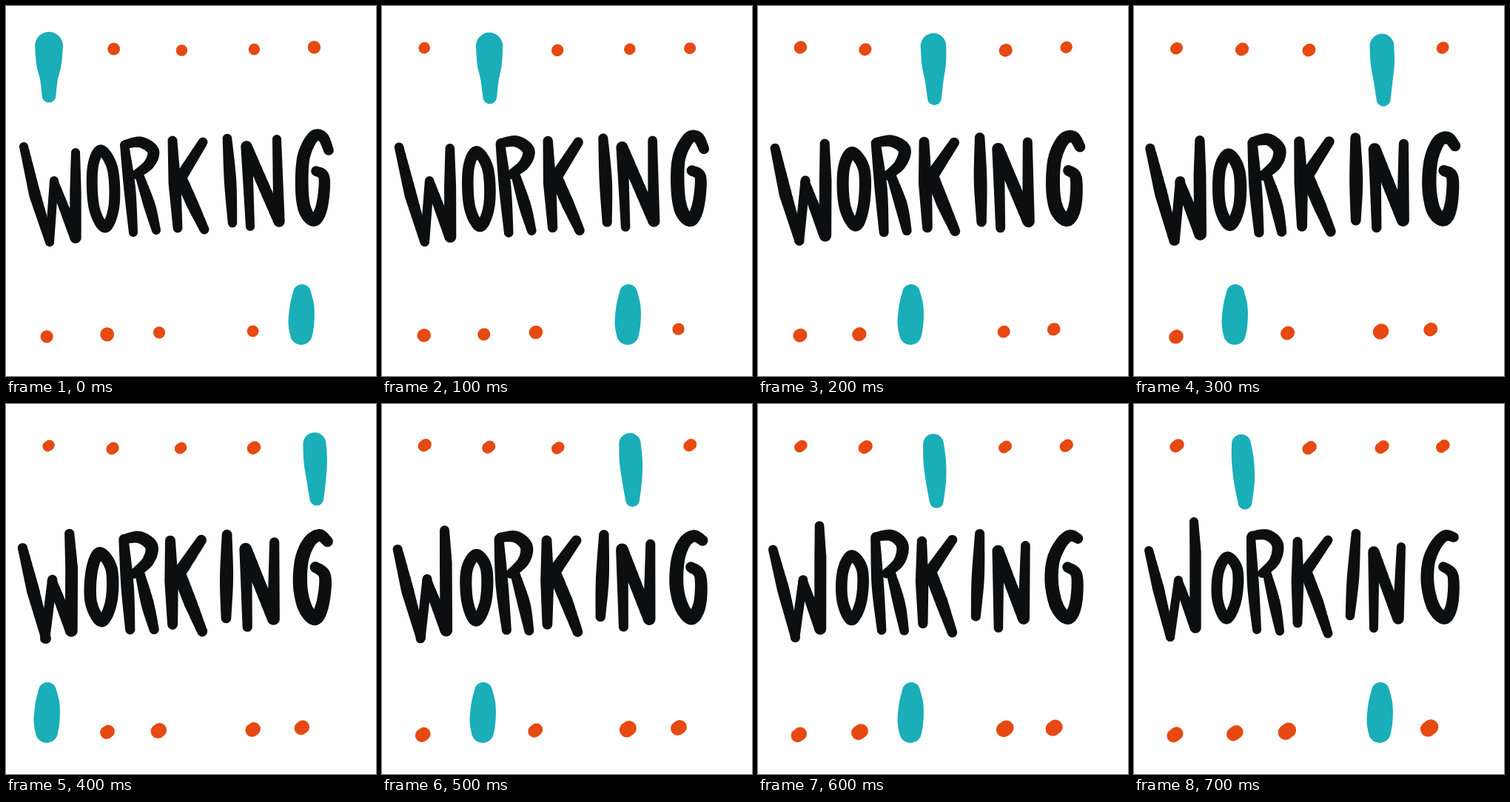
An HTML page with a canvas for the animation above (800 ms loop, 500 by 500 pixels).

```html
<!DOCTYPE html>
<html lang="en">
<head>
<meta charset="utf-8">
<title>Working</title>
<style>
  html, body { margin: 0; width: 100%; height: 100%; overflow: hidden; background: #fefefe; }
  /* eight drawings stacked in one strip, shown one at a time */
  canvas { display: block; width: 500px; height: 4000px; animation: flip 800ms steps(8) infinite; }
  @keyframes flip { to { transform: translateY(-4000px); } }
</style>
</head>
<body>
<canvas width="500" height="4000" role="img" aria-label="WORKING"></canvas>
<script>
const INK = '#0c0e0f', TEAL = '#1aaeb8', ORANGE = '#e64912';
const DRAWINGS = 8, STAGE = 500, STEP = 1.2;

// Each letter drifts between two poses: "x,y" points, "/" starts a new stroke.
const letters = {
  W: { kind: 'line', weight: 8,
    from: '24,190 39,255 59,319/59,319 65,236/65,238 94,313 94,250 94,198',
    to: '20,198 33,250 49,315/49,315 60,238/60,240 83,302 83,200 81,159' },
  O: { kind: 'loop', weight: 7.5,
    from: '128,195 117,220 119,272 134,299 146,270 144,220',
    to: '126,207 114,228 113,265 125,290 138,265 140,225' },
  R: { kind: 'curve', weight: 8,
    from: '160,188 167,245 172,306/161,187 182,184 199,196 193,214 175,228/181,231 194,270 203,303',
    to: '158,180 161,245 166,305/159,178 180,177 194,190 190,212 173,229/180,230 190,270 197,307' },
  K: { kind: 'line', weight: 8.5,
    from: '225,182 228,240 232,300/266,184 236,232 252,268 268,302',
    to: '221,186 221,240 221,296/262,184 232,226 248,268 262,310' },
  I: { kind: 'curve', weight: 8.3,
    from: '299,179 303,236 306,293',
    to: '300,175 296,235 292,286' },
  N: { kind: 'line', weight: 8,
    from: '330,298 325,190 369,291 366,180',
    to: '324,303 324,200 357,290 361,193' },
  G: { kind: 'curve', weight: 9,
    from: '436,195 428,177 415,177 402,205 400,250 405,278 417,289 427,270 430,232 419,223',
    to: '432,180 420,178 407,192 398,215 397,245 405,275 420,289 430,270 431,232 418,220' }
};

const topColumns = [58, 145, 237, 335, 417];
const lowColumns = [56, 137, 207, 333, 400];

const ctx = document.querySelector('canvas').getContext('2d');

const parse = text => text.split('/').map(s => s.split(' ').map(p => p.split(',').map(Number)));

const lerp = (p, q, u) => p.map((v, i) => v + (q[i] - v) * u);

// Seeded noise in -1..1
function noise(seed) {
  let s = seed * 7919 + 17;
  return () => (s = s * 16807 % 2147483647) / 1073741823.5 - 1;
}

function spline(a, b, c, d, u) {
  return b.map((v, i) => v + u / 2 * (c[i] - a[i] +
    u * (2 * a[i] - 5 * v + 4 * c[i] - d[i] + u * (3 * (v - c[i]) + d[i] - a[i]))));
}

// Brush stroke through [x, y, radius] points: overlapping circles.
function brush(pts, color, kind = 'curve') {
  const n = pts.length, loop = kind === 'loop';
  const at = i => pts[loop ? (i + n) % n : Math.max(0, Math.min(n - 1, i))];
  const stamp = ([x, y, r]) => {
    ctx.moveTo(x + r, y);
    ctx.arc(x, y, r, 0, 2 * Math.PI);
  };
  ctx.fillStyle = color;
  ctx.beginPath();
  stamp(pts[0]);
  for (let i = 0; i < (loop ? n : n - 1); i++) {
    const p = at(i), q = at(i + 1);
    const count = Math.ceil(Math.hypot(q[0] - p[0], q[1] - p[1]) / STEP);
    for (let k = 1; k <= count; k++) {
      const u = k / count;
      stamp(kind === 'line' ? lerp(p, q, u) : spline(at(i - 1), p, q, at(i + 2), u));
    }
  }
  ctx.fill();
}

// Ink is heaviest and shakiest halfway through the loop; strokes taper at their ends.
function drawLetter({ kind, weight, from, to }, u, rnd) {
  const mid = Math.sin(Math.PI * u), ends = parse(to);
  parse(from).forEach((stroke, i) => {
    const pts = stroke.map((p, j) => {
      const [x, y] = lerp(p, ends[i][j], u);
      const swell = kind === 'loop' ? 1 : 0.76 + 0.24 * Math.sin(Math.PI * j / (stroke.length - 1));
      return [x + rnd() * mid, y + rnd() * mid, (weight + 0.8 * mid) * swell];
    });
    brush(pts, INK, kind);
  });
}

function drawTopMarker(x, u) {
  brush([[x, 54, 19 - 6 * u], [x + 2 * u, 77, 17 - 2 * u],
    [x + 4 * u, 98 + 6 * u, 12 + 2 * u], [x + 5 * u, 121 + 12 * u, 9.5]], TEAL);
}

function drawLowMarker(x) {
  brush([[x, 388, 12], [x, 407, 16.5], [x - 1, 428, 17.5], [x - 1, 443, 15]], TEAL);
}

// Dots smear more and more to the upper right.
function drawDot(x, y, r, u) {
  brush([[x - 2 * u, y + 1.5 * u, r], [x + 2 * u, y - 1.5 * u, r]], ORANGE);
}

for (let i = 0; i < DRAWINGS; i++) {
  const u = i / (DRAWINGS - 1), rnd = noise(i + 1);
  const column = 4 - Math.abs(i - 4);
  ctx.setTransform(1, 0, 0, 1, 0, i * STAGE);

  for (const name of 'WORKING') drawLetter(letters[name], u, noise(i * 10 + name.charCodeAt(0)));

  // The markers sweep there and back in opposite directions, each covering a dot.
  for (let c = 0; c < 5; c++) {
    const arc = 55 + 5 * Math.sin(Math.PI * (c + 0.5) / 5);
    if (c === column) drawTopMarker(topColumns[c], u);
    else drawDot(topColumns[c] + rnd(), arc + rnd(), 8.2 - u + rnd() * 0.6, u);

    if (c === 4 - column) drawLowMarker(lowColumns[c]);
    else drawDot(lowColumns[c] + rnd(), 446 - 2.2 * c + rnd(), 8.6 + u + rnd(), u);
  }
}
</script>
</body>
</html>
```
